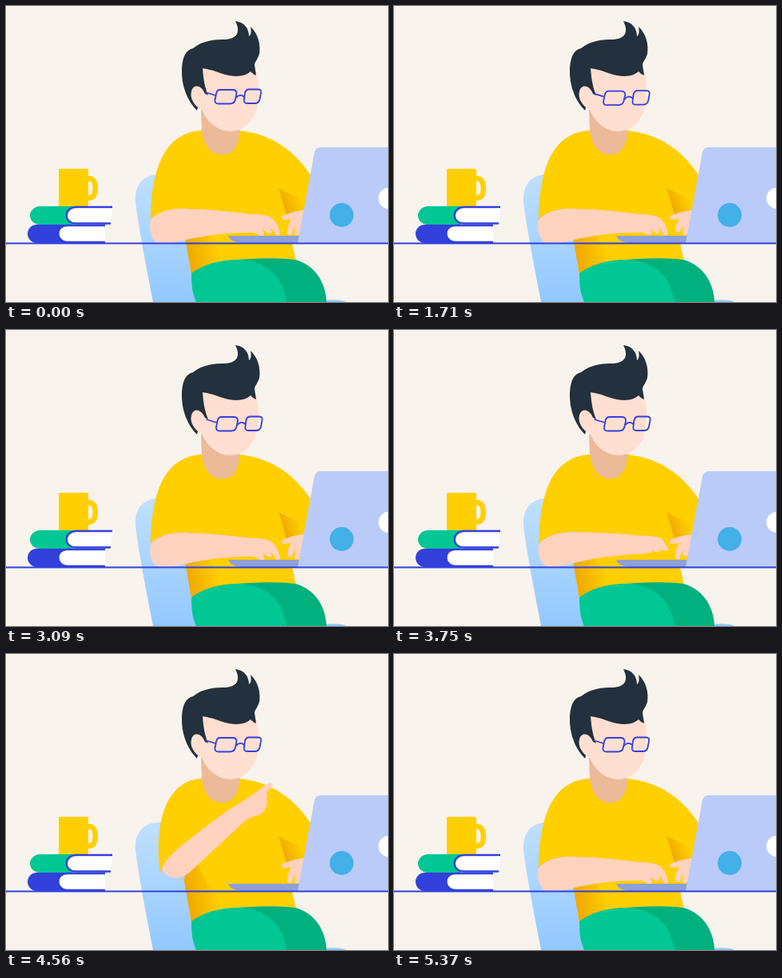
An HTML page that plays this animation: 478x371 px, repeating every 5400 ms.

```html
<!DOCTYPE html>
<html lang="en">
<head>
<meta charset="utf-8">
<title>Typing at the desk</title>
<style>
  html, body { margin: 0; width: 100%; height: 100%; overflow: hidden; background: #f8f3ec; }
  svg { display: block; width: 100vw; height: 100vh; }
</style>
</head>
<body>
<svg viewBox="0 0 478 371">
  <defs>
    <linearGradient id="chairTone" x2="0" y2="1">
      <stop stop-color="#c0e0ff"/><stop offset="1" stop-color="#92c8ff"/>
    </linearGradient>
    <linearGradient id="foldTone" gradientUnits="userSpaceOnUse" x1="226" x2="264" y1="290" y2="284">
      <stop stop-color="#f0aa00"/><stop offset="1" stop-color="#ffcf00"/>
    </linearGradient>
    <linearGradient id="sleeveTone" gradientUnits="userSpaceOnUse" x1="345" x2="368" y1="250" y2="241">
      <stop stop-color="#eea700"/><stop offset="1" stop-color="#ffcf00"/>
    </linearGradient>
  </defs>

  <!-- chair -->
  <path fill="url(#chairTone)" d="M192 211C175 211 161 221 162 243C163 262 176 330 184 371H245V211Z"/>
  <path fill="#92c8ff" d="M396 371V369Q419 367 426 371Z"/>

  <!-- torso -->
  <path fill="#ffcf00" d="M245 156H292C335 161 362 183 382 213L378 260L366 290L358 297L363 320L290 330L232 336L223 283L229 240Z"/>
  <path fill="url(#foldTone)" d="M231 234C235 260 250 290 280 319C255 322 240 328 232 336L223 285Z"/>
  <path fill="url(#sleeveTone)" d="M341 228C345 240 348 251 351 263L372 258L377 245C366 239 352 235 341 228Z"/>

  <!-- legs -->
  <path fill="#00b07d" d="M280 319C315 315 345 316 362 318C385 324 400 345 401 371H300Z"/>
  <path fill="#00c794" d="M232 335C245 325 265 318 291 318C328 320 347 340 351 371H238C233 360 232 350 232 335Z"/>

  <path id="sleeve" fill="#ffcf00"/>

  <!-- head -->
  <path fill="#ebba98" d="M244 130L245 158C249 178 258 186.500 270 186.500C283 186.500 292 176 292 156V140Z"/>
  <path fill="#ffdfd2" d="M240 74L312 78C316 92 317 108 315 122C312 143 298 157 281 157C264 157 250 144 245 129C237 130 231 119 231 109C231 100 239 97 246 103Z"/>
  <path fill="#23303d" d="M239 131C227 119 219 100 220 78C221 62 226 55 234 53C246 43 262 42 274 42C289 41 294 33 287 19C298 20 304 28 304 38C307 36 307 31 306 26C315 34 319 48 317 60C315 67 311 70 311 74L313 87C310 86 308 84 306 82C299 89 285 90 268 84C258 80 251 79 246 78C247 92 249 103 253 112L249 110C244 98 234 98 232 107C230 114 234 122 240 127Z"/>
  <g id="glasses" fill="none" stroke="#3240dc" stroke-width="1.8">
    <path d="M249 108L262 112M288 115C291 111 295 111 298 114"/>
    <path d="M268 105H283Q289 105 288.500 110L287 117Q286 122.500 280 122.500H266Q261 122.500 261.500 118L263 110Q264 105 268 105Z"/>
    <path d="M304 104.500H315Q320 104.500 319 109L317.500 117Q316.500 122 311 122H302Q297 122 298 117L299 109Q300 104.500 304 104.500Z"/>
  </g>

  <!-- laptop and hands -->
  <path fill="#8fa1d5" d="M278 288H370V297H293Q281 296 278 288Z"/>
  <path id="farHand" fill="#fdd2be"/>
  <path fill="#bacbfa" d="M365 297L386 183Q388 177 394 177H478V297Z"/>
  <circle cx="420" cy="262" r="15" fill="#43b0e8"/>
  <circle cx="479" cy="241" r="13" fill="#fff"/>
  <path id="arm" fill="#fdd2be"/>

  <!-- mug and books -->
  <rect x="66" y="204" width="37" height="47" rx="1.5" fill="#ffcf00"/>
  <path fill="none" stroke="#ffcf00" stroke-width="6.500" d="M102 216.500C109 215.500 111.800 220 111.800 228.500S109 241 102 240.500"/>
  <path fill="#00c794" d="M43 251H84V274H43C34 274 30 268 30 262.500S35 251 43 251Z"/>
  <path fill="#3240dc" d="M39 274H80V297H39C31 297 27 291 27 285.500S31 274 39 274Z"/>
  <g fill="#fff" stroke="#3240dc" stroke-width="2.400">
    <path d="M124 275H77C61 275 62 296 77 296H124"/>
    <path d="M133 252H87C72 253 72 272 87 272.500H131"/>
  </g>
  <path stroke="#3240dc" stroke-width="2" d="M0 297.500H478"/>
</svg>
<script>
const LOOP = 5400;
const el = id => document.getElementById(id);
const shape = (id, d) => el(id).setAttribute('d', d);
const move = (id, value) => el(id).setAttribute('transform', value);
const ramp = (t, from, to) => Math.min(1, Math.max(0, (t - from) / (to - from)));
const ease = (t, from, to) => {
  const x = ramp(t, from, to);
  return x * x * (3 - 2 * x);
};

// Blends two paths that share the same commands.
function mix(a, b, k) {
  const ends = b.match(/-?[\d.]+/g);
  let i = 0;
  return a.replace(/-?[\d.]+/g, n => (+n + (ends[i++] - n) * k).toFixed(2));
}

const pointing = 'M180 277C184 268 200 265 224 263C255 261 285 258 308 260' +
  'C314 259 322 261 329 260C337 260 345 258 353 260L355 264C350 267 346 267 343 267' +
  'C343 270 341 273 338 275L338 277C336 279 335 280 334 281C332 283 330 284 328 285' +
  'L324 286C318 286 310 282 302 282C275 286 240 292 212 296C206 298 198 297 192 295C184 291 181 284 180 277Z';

// a, b and c lift the three fingertips off the keys.
const typing = (a, b, c) => 'M181 268C190 258 205 254 222 254C255 255 285 258 308 261' +
  `C318 261 329 262 334 ${267 - a / 3}C339 271 342 279 343 ${287 - a}L338 ${288 - a}C336 283 334 280 331 278` +
  `C332 281 333 284 333 ${288 - b}L327 ${288 - b}C325 283 323 281 321 279` +
  `C322 282 323 285 323 ${288 - c}L317 ${288 - c}C314 284 309 284 303 284` +
  'C275 284 245 288 222 294C208 297 200 298 192 297C182 296 178 280 181 268Z';

const farHand = (a, b) =>
  'M374 256C362 257 353 260 346 263C344 265 345 268 348 268L357 267' +
  `C353 273 352 279 352 ${285 - a}C353 ${288 - a} 358 ${288 - a} 358 ${286 - a}` +
  `C359 281 360 278 362 276L361 ${286 - b}C362 ${288 - b} 367 ${288 - b} 368 ${285 - b}L374 268Z`;

const sleeveDown = 'M246 156C200 158 182 200 181 268C190 258 205 254 222 254L262 255L262 156Z';
const sleeveUp = 'M246 156C204 157 184 205 193 275C196 262 212 246 228 237L262 228L262 156Z';

function draw(t) {
  const lift = ease(t, 3700, 4250) - ease(t, 4300, 4930);
  const curl = ease(t, 3600, 3740) - ease(t, 4950, 5100);
  const point = ease(t, 3700, 4000) - ease(t, 4650, 5000);
  const slip = ramp(t, 870, 2850) - ease(t, 4160, 4270);
  const tap = phase => 4 * Math.max(0, Math.sin(2 * Math.PI * (t / 450 + phase)));
  const finger = phase => tap(phase) * (1 - curl) + 6 * curl;

  shape('sleeve', mix(sleeveDown, sleeveUp, lift / 0.63));
  shape('arm', mix(typing(finger(0), finger(0.35), finger(0.65)), pointing, point));
  move('arm', `translate(${22 * lift} ${-22 * lift}) rotate(${-54 * lift} 196 278)`);
  shape('farHand', farHand(tap(0.5), tap(0.85)));
  move('glasses', `translate(${1.5 * slip} ${4 * slip})`);
}

function tick() {
  draw(performance.now() % LOOP);
  requestAnimationFrame(tick);
}
tick();
</script>
</body>
</html>
```
